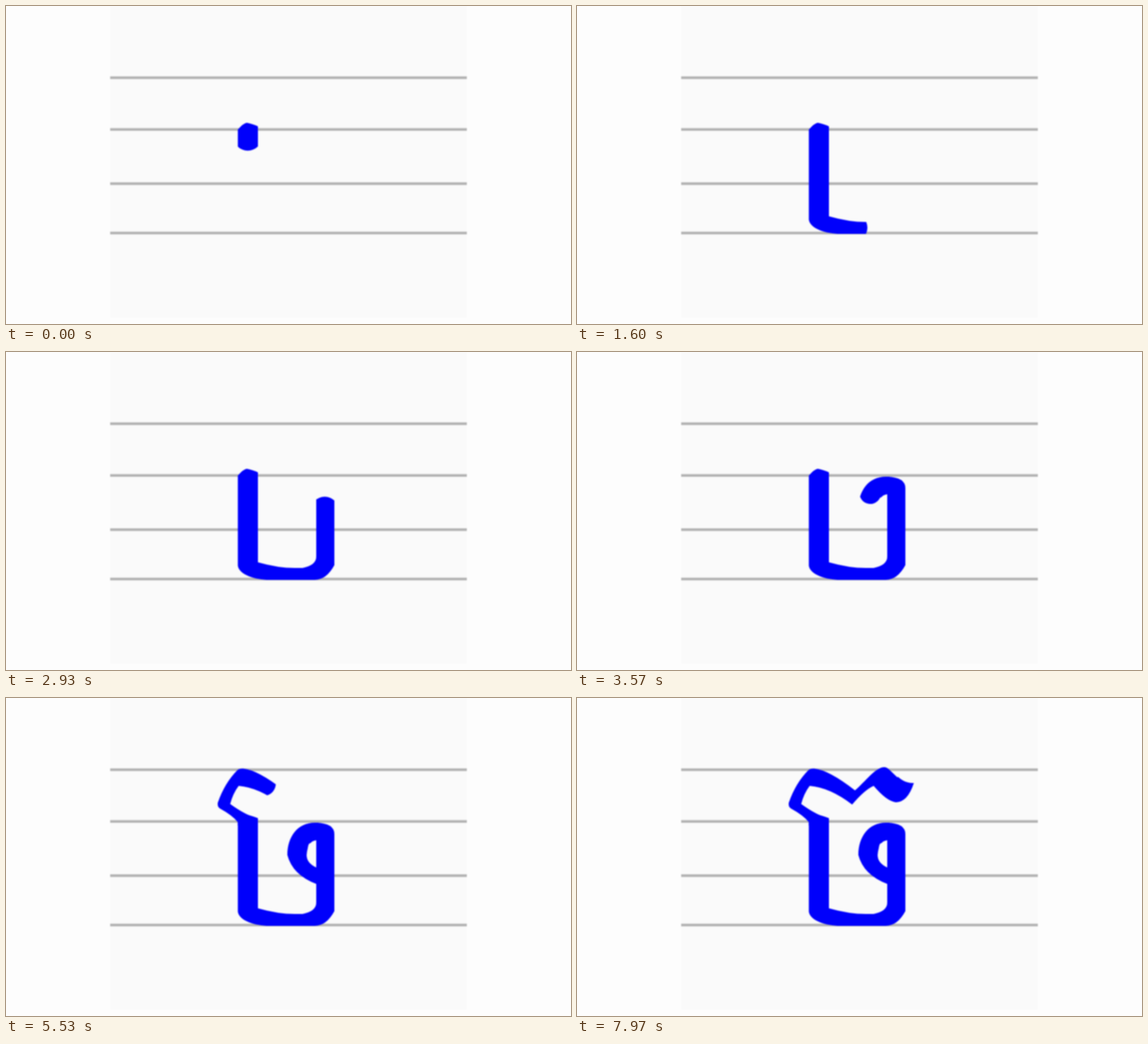
These frames come from a looping animation (998x561 px, 8 s). An HTML page with a canvas:

```html
<!DOCTYPE html>
<html lang="en">
<head>
<meta charset="utf-8">
<title>Letter writing</title>
<style>
  html, body { margin: 0; width: 100%; height: 100%; overflow: hidden; background: #fdfdfd; }
  canvas { display: block; width: 998px; height: 561px; filter: blur(1px); }
</style>
</head>
<body>
<canvas id="stage" width="998" height="561"></canvas>
<script>
const ctx = document.getElementById('stage').getContext('2d');
const LOOP = 8000;
const SPEED = 0.13; // pen travel in px per ms
const RULES = [126.5, 217.8, 313.4, 400.5];

// Each part is an outline uncovered by a round brush moving along a trail.
function part(start, brush, outline, trail) {
  return { start, brush, shape: new Path2D(outline), trail: new Path2D(trail) };
}

const stem = part(0, 50,
  `M409.5 218 Q419 207 425 206 Q432 207 445 212 V371 Q480 381 510 381 H524
   Q548 376 548 361 V220 Q580 221 580 240 V376 Q566 402 545 402 H465
   C440 402 412 393 409.5 377 Z`,
  'M427 230 V360 Q427 391 470 391 H528 Q563 391 563 358 V262 Q563 237 540 237');

const bowl = part(3070, 38,
  `M552 220 H545 C515 220 497 245 497 277 Q506 312 548 328 H552 V299 H548
   Q531 291 531 277 Q533 252 548 251 H552 Z`,
  'M563 262 Q563 237 540 237 Q514 237 514 270 Q514 300 555 316');

const crest = part(4380, 44,
  `M409.5 225 V219 Q400 207 378 195 Q373 192 374 185 Q386 150 409 127
   Q412 124 419 124.500 Q445 127 491 163 C510 147 527 122 543 122
   C561 123 566 151 595 150 Q584 184 563 184 Q547 182 524 155
   Q508 162 486 188 Q447 158 411 155 Q401 168 396 187 Q425 208 445 212 V225 Z`,
  `M428 212 L385 188 L410 140 Q434 140 455 151 L487 170 L536 142
   L558 163 L578 160`);

function drawPart({ start, brush, shape, trail }, time) {
  if (time < start) return;
  ctx.save();
  ctx.clip(shape);
  ctx.lineWidth = brush;
  ctx.setLineDash([(time - start) * SPEED + 0.1, LOOP]);
  ctx.stroke(trail);
  ctx.restore();
}

function fill(color, x, y, w, h) {
  ctx.fillStyle = color;
  ctx.fillRect(x, y, w, h);
}

function draw() {
  const time = performance.now() % LOOP;
  fill('#fdfdfd', 0, 0, 998, 561);
  fill('#fafafa', 184, 0, 630, 550);
  for (const y of RULES) fill('#b2b2b2', 184, y - 2.3, 630, 4.6);
  ctx.strokeStyle = '#0000fb';
  ctx.lineCap = ctx.lineJoin = 'round';
  for (const p of [stem, bowl, crest]) drawPart(p, time);
  requestAnimationFrame(draw);
}
draw();
</script>
</body>
</html>
```
